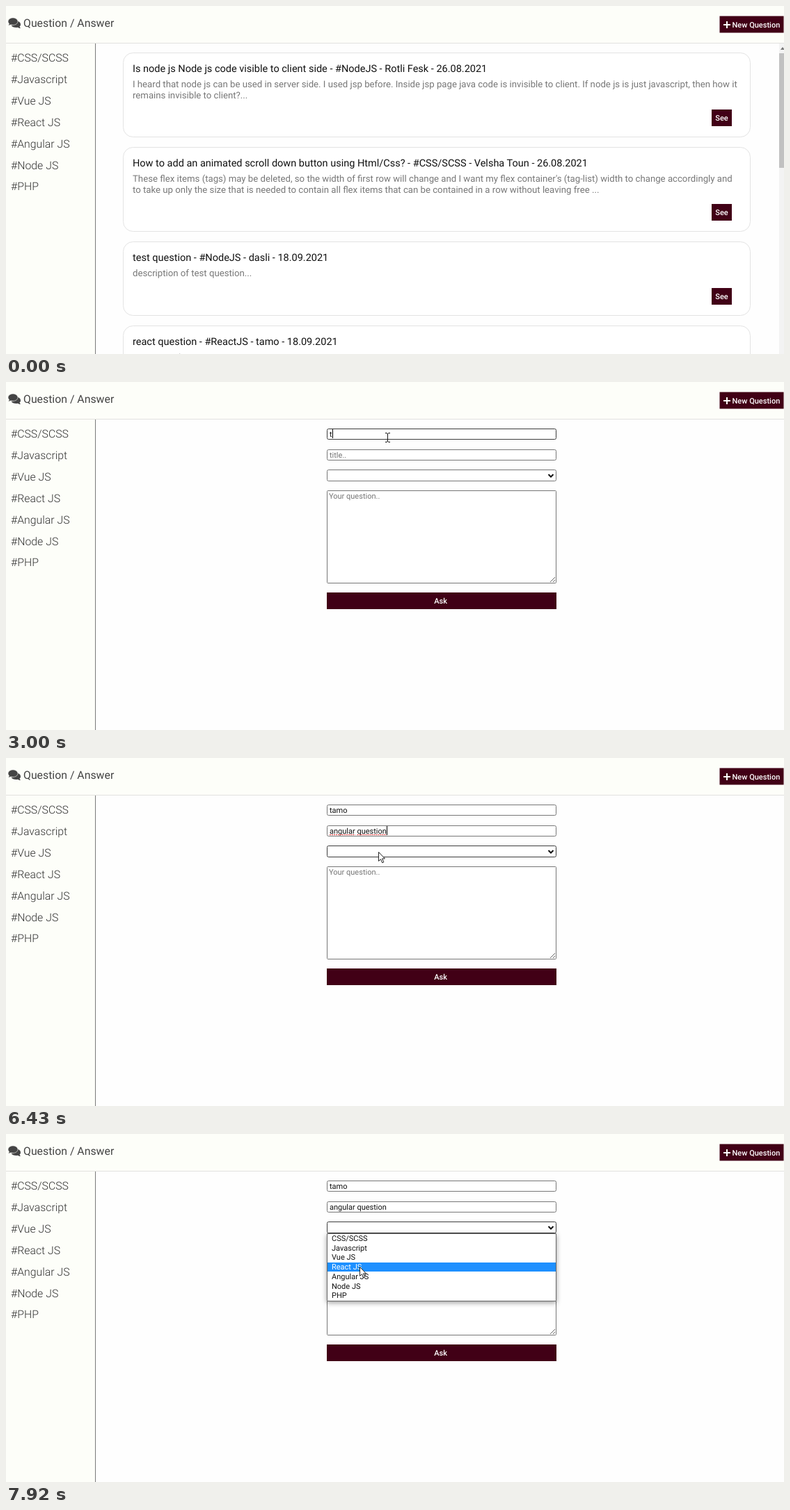
Recreate the animation shown at these times as an HTML page with a canvas. Size 1118 px wide and 501 px high, loop 7.99 s.

```html
<!DOCTYPE html>
<html lang="en">
<head>
<meta charset="utf-8">
<title>Question / Answer</title>
<style>
html, body { margin: 0; width: 100%; height: 100%; overflow: hidden; background: #fefefe; }
canvas { display: block; }
</style>
</head>
<body>
<canvas id="stage" width="1118" height="501"></canvas>
<script>
const c = document.getElementById('stage').getContext('2d');
c.textRendering = 'geometricPrecision';

const LOOP = 7990, FORM_AT = 1770, OPEN_AT = 6560;
const WINE = '#410016', PALE = '#fdfef9', GREY = '#757575';
const TAGS = ['CSS/SCSS', 'Javascript', 'Vue JS', 'React JS', 'Angular JS', 'Node JS', 'PHP'];
const USER = 'tamo', TITLE = 'angular question';
const ROW = 13.7, MENU_TOP = 144, FIELD_H = 16;

const CARDS = [
  { y: 67, h: 122, title: 'Is node js Node js code visible to client side - #NodeJS - Rotli Fesk - 26.08.2021',
    lines: ['I heard that node js can be used in server side. I used jsp before. Inside jsp page java code is invisible to client. If node js is just javascript, then how it',
            'remains invisible to client?...'] },
  { y: 203, h: 122, title: 'How to add an animated scroll down button using Html/Css? - #CSS/SCSS - Velsha Toun - 26.08.2021',
    lines: ["These flex items (tags) may be deleted, so the width of first row will change and I want my flex container's (tag-list) width to change accordingly and",
            'to take up only the size that is needed to contain all flex items that can be contained in a row without leaving free ...'] },
  { y: 339, h: 107, title: 'test question - #NodeJS - dasli - 18.09.2021', lines: ['description of test question...'] },
  { y: 460, h: 107, title: `react question - #ReactJS - ${USER} - 18.09.2021`, lines: ['react question...'] }
];

// Pointer path: time, x, y
const PATH = [
  [130, 811, 490], [330, 640, 430], [540, 430, 385], [670, 357, 360], [870, 436, 318],
  [940, 520, 276], [1080, 780, 140], [1230, 962, 58], [1300, 962, 58],
  [1430, 1042, 24], [1560, 1042, 22], [1700, 1005, 9], [1770, 978, 20],
  [1830, 943, 31], [1900, 943, 31], [2100, 760, 52], [2350, 575, 76],
  [2520, 549, 79], [2590, 548, 80], [5890, 548, 82], [6220, 547, 117],
  [6360, 540, 130], [6430, 535, 135], [6640, 533, 136], [6900, 515, 152],
  [6970, 512, 156], [7030, 512, 156], [7040, 511, 159], [7300, 511, 160],
  [7600, 510, 174], [7920, 508, 191]
];

const clamp = (v, lo, hi) => Math.min(hi, Math.max(lo, v));
const inside = (p, x, y, w, h) => p.x >= x && p.x < x + w && p.y >= y && p.y < y + h;

function rect(x, y, w, h, color) {
  c.fillStyle = color;
  c.fillRect(x, y, w, h);
}

function text(str, x, y, size = 11, color = '#111', weight = 400, align = 'left') {
  c.font = `${weight} ${size}px Roboto, sans-serif`;
  c.textAlign = align;
  c.fillStyle = color;
  c.fillText(str, x, Math.round(y));
}

function box(x, y, w, h, radius, stroke) {
  c.beginPath();
  c.roundRect(x + .5, y + .5, w - 1, h - 1, radius);
  c.fillStyle = '#fff';
  c.fill();
  c.strokeStyle = stroke;
  c.lineWidth = 1;
  c.stroke();
}

function shape(d, x, y, fill, stroke, width = 1) {
  const path = new Path2D(d);
  c.save();
  c.translate(x, y);
  c.lineWidth = width;
  if (fill) { c.fillStyle = fill; c.fill(path); }
  if (stroke) { c.strokeStyle = stroke; c.stroke(path); }
  c.restore();
}

function textWidth(str) {
  c.font = '400 11px Roboto, sans-serif';
  return c.measureText(str).width;
}

function pointerAt(t) {
  const i = PATH.findIndex(k => k[0] > t);
  if (i === 0) return null;
  if (i < 0) { const [, x, y] = PATH.at(-1); return { x, y }; }
  const [t0, x0, y0] = PATH[i - 1], [t1, x1, y1] = PATH[i];
  const f = (t - t0) / (t1 - t0);
  return { x: Math.round(x0 + (x1 - x0) * f), y: Math.round(y0 + (y1 - y0) * f) };
}

function drawFrame() {
  rect(0, 0, 1118, 501, '#fefefe');
  rect(0, 0, 1118, 53, PALE);
  rect(0, 53, 128, 448, PALE);
  rect(0, 53, 1118, 1, '#e2e2df');
  rect(128, 54, 1, 447, '#7b7b7b');

  // Speech bubbles
  shape('M15 21c4 1 6 3 6 5.500c0 1.500-.7 2.500-1.500 3.300c.3 1 1 1.700 1.500 2.200c-1.800 0-3-.4-4-1.200c-4 .8-8-.4-9.500-3c5 0 8.500-3 7.500-6.800z', 0, 0, '#444');
  shape('M10 17c4 0 7 2.300 7 5.200s-3 5.200-7 5.200c-1.200 0-2.300-.2-3.200-.5c-1 .7-2.300 1.100-3.800 1.100c.7-.7 1.300-1.600 1.500-2.500c-.9-.9-1.500-2-1.500-3.300c0-2.900 3-5.200 7-5.200z', 0, 0, '#444', PALE, .6);
  text('Question / Answer', 25, 30, 15.84, '#444');

  rect(1025.5, 14.5, 92, 24, WINE);
  rect(1031, 26, 10, 2, '#fff');
  rect(1035, 22, 2, 10, '#fff');
  text('New Question', 1043.5, 31, 11, '#fff', 500);

  TAGS.forEach((tag, i) => text('#' + tag, 7, 80 + i * 30.9, 15.84, '#333', 300));
}

function drawList() {
  for (const { y, h, title, lines } of CARDS) {
    box(168, y, 902, h, 14, '#e3e3e3');
    text(title, 182, y + 28, 14.5, '#111');
    lines.forEach((line, i) => text(line, 182, y + 50 + i * 16, 13.2, '#777'));
    rect(1014, y + h - 40, 29, 24, WINE);
    text('See', 1028.5, y + h - 24, 11, '#fff', 500, 'center');
  }
  rect(1111, 54, 7, 447, '#f3f3f3');
  rect(1111, 68, 7, 165, '#c1c1c1');
  shape('M0 4L3 0L6 4z', 1113, 59, '#777');
}

function field(y, p, h = FIELD_H, active = false) {
  const hover = active || inside(p, 461, y, 330, h);
  box(461, y, 330, h, 2, hover ? '#3c3c3c' : '#767676');
}

function squiggle(x, y, width) {
  c.strokeStyle = '#e02020';
  c.lineWidth = 1;
  c.setLineDash([2, 1]);
  c.beginPath();
  c.moveTo(x, y);
  c.lineTo(x + width, y);
  c.stroke();
  c.setLineDash([]);
}

function entry(typed, hint, baseline) {
  text(typed || hint, 465, baseline, 11, typed ? '#111' : GREY);
}

function caret(typed, baseline) {
  rect(Math.round(465 + textWidth(typed)), baseline - 11, 1, 13, '#000');
}

function drawMenu(p) {
  const top = MENU_TOP - 1;
  c.save();
  c.shadowColor = 'rgba(0,0,0,.4)';
  c.shadowBlur = 7;
  c.shadowOffsetY = 2;
  rect(461, top, 330, 98, '#fff');
  c.restore();
  box(461, top, 330, 98, 0, '#666');
  const hot = Math.floor((p.y - MENU_TOP) / ROW);
  const rowTop = i => Math.floor(MENU_TOP + i * ROW);
  TAGS.forEach((tag, i) => {
    if (i === hot) rect(462, rowTop(i), 328, rowTop(i + 1) - rowTop(i), '#1e90ff');
    text(tag, 468, 154 + i * ROW, 11, i === hot ? '#fff' : '#111');
  });
}

function drawForm(t, p) {
  const open = t >= OPEN_AT;
  const user = USER.slice(0, clamp(Math.floor((t - 3000) / 82) + 1, 0, 4));
  const first = clamp(Math.floor((t - 3930) / 87) + 1, 0, 8);
  const second = clamp(Math.floor((t - 4800) / 77) + 1, 0, 8);
  const title = TITLE.slice(0, first + second);

  field(67, p);
  entry(user, 'your name..', 79);
  field(97, p);
  entry(title, 'title..', 109);
  if (t >= 2520 && t < 3530) {
    caret(user, 79);
    if (t >= 3328) squiggle(465, 80.5, textWidth(user));
  } else if (t >= 3530 && !open) {
    caret(title, 109);
    if (first === 8) squiggle(465, 110.5, textWidth('angular'));
    if (second === 8) squiggle(465 + textWidth('angular '), 110.5, textWidth('question'));
  }

  field(126, p, 17, open);
  shape('M0 0L3.500 3.500L7 0', 779.5, 133, null, '#111', 2);

  box(461, 156, 330, 134, 1, '#767676');
  text('Your question..', 464, 168, 11, GREY);
  shape('M0 7L7 0M4 7L7 4', 782, 281, null, '#666');

  rect(461, 303, 330, 24, WINE);
  text('Ask', 624.5, 319, 11, '#fff', 500, 'center');
  if (open) drawMenu(p);
}

function drawPointer(p, form) {
  const overField = form && [67, 97].some(y => inside(p, 461, y, 330, FIELD_H));
  if (overField) {
    shape('M-3 -6.500H-1L.5 -5.500L2 -6.500H4M.5 -5.500V5.500M-3 6.500H-1L.5 5.500L2 6.500H4', p.x, p.y, null, '#111');
  } else if (inside(p, 1025, 15, 92, 23)) {
    shape('M-1.500 1C-1.500-.5 1-.5 1 1V6C5 5 9 6 9 8V12L7 16H0L-5 9C-5 7-3 7-1.500 9z', p.x, p.y, '#fff', '#111');
  } else {
    shape('M.5 .5V13.500L3.500 10.700L5.700 15.800L7.800 14.900L5.600 9.900H9.500z', p.x, p.y, '#fff', '#222');
  }
}

function render() {
  const t = performance.now() % LOOP;
  const p = pointerAt(t), form = t >= FORM_AT;
  drawFrame();
  if (form) drawForm(t, p); else drawList();
  if (p) drawPointer(p, form);
  requestAnimationFrame(render);
}
render();
</script>
</body>
</html>
```
